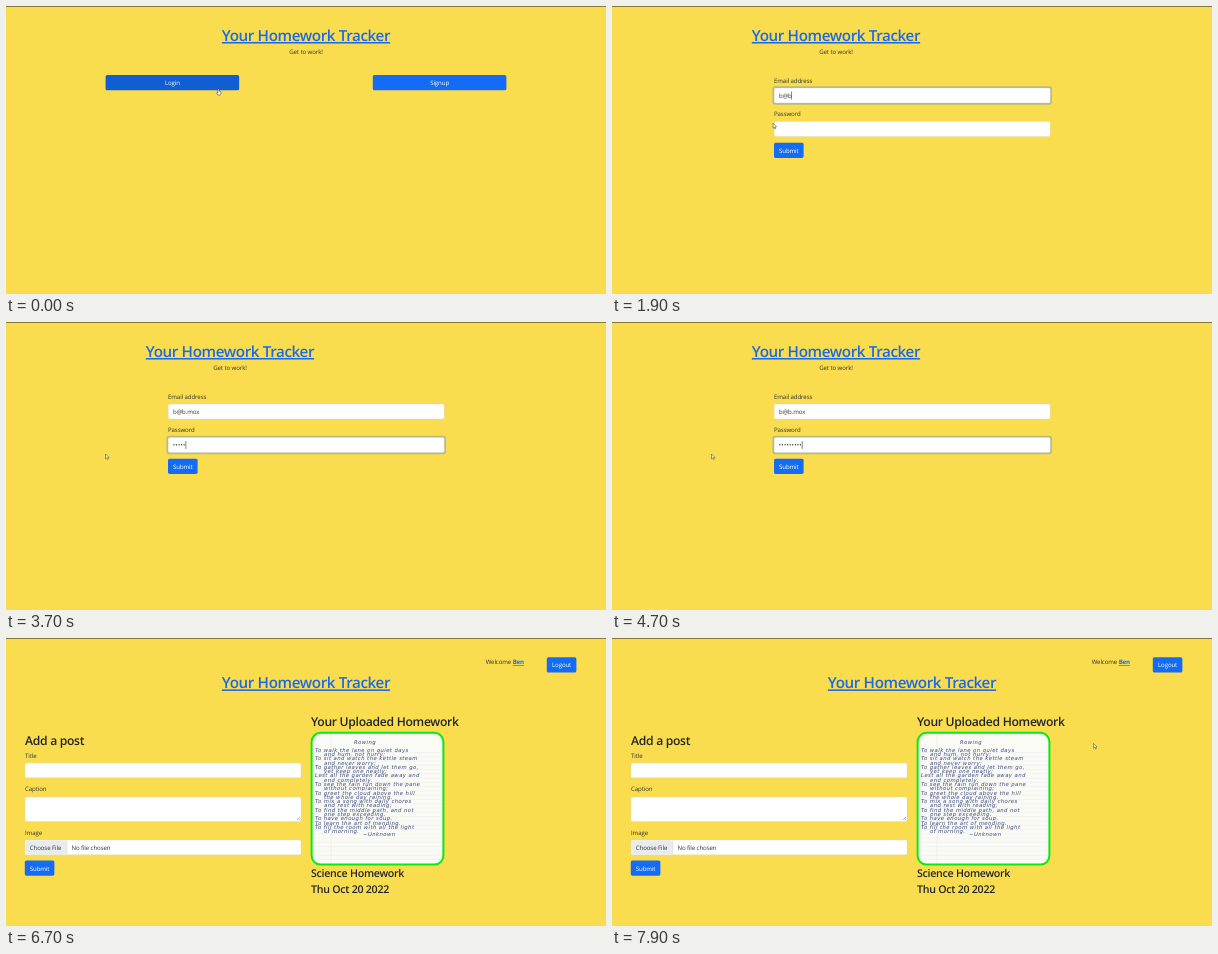
An HTML page that plays this animation: 600 px wide and 288 px high, repeating every 8 s.

```html
<!DOCTYPE html>
<html lang="en">
<head>
<meta charset="utf-8">
<title>Homework tracker</title>
<style>
  html, body { margin: 0; width: 100%; height: 100%; overflow: hidden; background: #f9dd4e; }
  svg { display: block; width: 100%; height: 100%; }
  text {
    font-family: "Open Sans", "Noto Sans", sans-serif;
    letter-spacing: -.015em; fill: #33342c;
    text-rendering: geometricPrecision; white-space: pre;
  }
  .head { font-weight: 600; letter-spacing: -.025em; fill: #212529; }
  .link { fill: #1a69ea; text-decoration: underline; }
  .mid { text-anchor: middle; }
  .white { fill: #fff; }
  .dots { letter-spacing: .045em; }
  .note { font-family: "DejaVu Sans", sans-serif; font-style: italic; letter-spacing: .08em; fill: #36457c; }
</style>
</head>
<body>
<svg id="stage" viewBox="0 0 600 288" preserveAspectRatio="none"></svg>
<script>
const LOOP = 8000, STEP = 100, BLUE = '#146cf6';
const stage = document.getElementById('stage');

// Nominal sizes are trimmed a little to suit the font's large x-height.
const text = (x, y, size, str, cls = '', id = '') =>
  `<text id="${id}" class="${cls}" x="${x}" y="${y}" font-size="${(size * .95).toFixed(2)}">${str}</text>`;
const body = (x, y, str, cls, id) => text(x, y, 6.4, str, cls, id);
const head = (x, y, size, str) => text(x, y, size, str, 'head');
const title = (x, y) => text(x, y, 16, 'Your Homework Tracker', 'head link mid');
const box = (x, y, w, h, fill, more = '') =>
  `<rect x="${x}" y="${y}" width="${w}" height="${h}" rx="1.6" fill="${fill}" ${more}/>`;
const button = (x, y, w, label, id = '') =>
  box(x, y, w, 15.2, BLUE, `id="${id}"`) + body(x + w / 2, y + 10, label, 'mid white');
const field = (x, y, h = 15.2) =>
  box(x + .2, y + .2, 276, h - .4, '#fff', 'stroke="#ced4da" stroke-width=".4"');
const glow = (x, y, w, id) =>
  `<g id="${id}">${box(x - .8, y - .8, w + 1.6, 16.8, 'none', 'stroke="#0d6efd" stroke-opacity=".28" stroke-width="1.6"')}` +
  box(x, y, w, 15.2, 'none', 'stroke="#86a8c8" stroke-width=".5"') + '</g>';

const poem = `To walk the lane on quiet days
and hum, not hurry;
To sit and watch the kettle steam
and never worry;
To gather leaves and let them go,
yet keep one neatly;
Lest all the garden fade away and
end completely.
To see the rain run down the pane
without complaining;
To greet the cloud above the hill
the whole day raining.
To mix a song with daily chores
and rest with reading;
To find the middle path, and not
one step exceeding.
To have enough for soup.
To learn the art of mending.
To fill the room with all the light
of morning.`.split('\n');

function paper() {
  const note = (x, y, str) => text(x, y.toFixed(2), 5.6, str, 'note');
  let out = '<rect x="306" y="95" width="131.5" height="131.5" rx="9" fill="#fbfbf6"/>' +
    '<path d="M325 96V225.5" stroke="#e6dcd8" stroke-width=".5"/>';
  for (let y = 114.5; y < 225; y += 4.28)
    out += `<path d="M307 ${y.toFixed(2)}H436.5" stroke="#dfe2e4" stroke-width=".35"/>`;
  out += note(348, 105.8, 'Rowing');
  poem.forEach((line, i) => {
    out += note(/^[A-Z]/.test(line) ? 309 : 318, 113.8 + i * 4.28, line);
  });
  return out + note(357, 198.3, '~Unknown') +
    '<rect x="305.6" y="94.8" width="131.8" height="131.8" rx="9" fill="none" stroke="#08ea16" stroke-width="2"/>';
}

const home = title(300, 35) + body(300, 48.2, 'Get to work!', 'mid') +
  glow(99.6, 69.1, 133.6, 'loginGlow') +
  button(99.6, 69.1, 133.6, 'Login', 'login') + button(366.8, 69.1, 133.6, 'Signup');

const form = title(224, 35) + body(224, 48.2, 'Get to work!', 'mid') +
  body(162, 76.6, 'Email address') + glow(162, 81.9, 276.4, 'mailGlow') + field(162, 81.9) +
  body(162, 110.2, 'Password') + glow(162, 115.4, 276.4, 'passGlow') + field(162, 115.4) +
  body(167, 91.8, '', '', 'mail') + body(166.8, 125.2, '', 'dots', 'pass') +
  '<rect id="caret" width=".6" height="8" fill="#333"/>' +
  button(162, 136.7, 29.6, 'Submit');

const board = body(479.7, 26.2, 'Welcome <tspan class="link" font-weight="700">Ben</tspan>') +
  button(540.8, 19.3, 29.6, 'Logout') + title(300, 50.4) +
  head(19, 106.8, 12.8, 'Add a post') +
  body(19, 119.7, 'Title') + field(18.8, 124.8) +
  body(19, 153.3, 'Caption') + field(18.8, 158.8, 24.8) +
  '<path d="M291 182l3 -3M292.8 182l1.2 -1.2" stroke="#777" stroke-width=".5"/>' +
  body(19, 196.5, 'Image') + field(18.8, 201.8) +
  box(19.2, 202.2, 41.6, 14.4, '#e9ecef') + '<path d="M60.8 202.2v14.4" stroke="#ced4da" stroke-width=".5"/>' +
  body(23.8, 211.9, 'Choose File') + body(65.4, 211.9, 'No file chosen') +
  button(18.8, 222.5, 29.6, 'Submit') +
  head(305, 88, 12.8, 'Your Uploaded Homework') + paper() +
  head(305, 238.6, 11.2, 'Science Homework') + head(305, 255, 11.2, 'Thu Oct 20 2022');

const cursors = {
  arrow: '<path d="M0 0V4.8L1.2 3.8L2 5.6L2.8 5.2L2.1 3.5H3.5Z" fill="#fff" stroke="#333" stroke-width=".5"/>',
  beam: '<path d="M-1 -2.6H1M0 -2.6V2.6M-1 2.6H1" fill="none" stroke="#222" stroke-width=".6"/>',
  hand: '<path d="M-.6 -3Q0 -3.6 .5 -3V-1L2.4 -.4V1.4L1.7 3H-.8L-2 .9L-1.4 .3L-.6 .9Z" fill="#fff" stroke="#222" stroke-width=".5"/>'
};

stage.innerHTML = '<rect width="600" height="288" fill="#f9dd4e"/><rect width="600" height="1" fill="#857839"/>' +
  `<g id="home">${home}</g><g id="form">${form}</g><g id="board">${board}</g><g id="cursor">` +
  Object.entries(cursors).map(([k, v]) => `<g id="${k}">${v}</g>`).join('') + '</g>';

const $ = id => document.getElementById(id);
const show = (id, on) => $(id).setAttribute('display', on ? 'inline' : 'none');

const MAIL = 'b@b.mox', TO_FORM = 500, TO_BOARD = 6300;
const MAIL_FOCUS = 1300, PASS_FOCUS = 2500;
const typed = (t, start, gap, max) => Math.max(0, Math.min(max, Math.floor((t - start) / gap) + 1));

// Pointer stops: time, x, y
const stops = [
  [0, 212.5, 86], [700, 212.5, 86], [1000, 213, 87], [1500, 213, 87], [2100, 143, 128],
  [2800, 127.5, 133], [3000, 99.5, 132], [5700, 99.5, 132], [5800, 102, 134],
  [6800, 102, 134], [7500, 478, 103], [7900, 481.5, 105.5], [LOOP, 481.5, 105.5]
];
function pointer(t) {
  const i = stops.findIndex(s => s[0] > t), a = stops[i - 1], b = stops[i];
  const u = (t - a[0]) / (b[0] - a[0]), k = u * u * (3 - 2 * u);
  return [a[1] + (b[1] - a[1]) * k, a[2] + (b[2] - a[2]) * k];
}
function pointerKind(t, x, y) {
  if (t < TO_FORM) return 'hand';
  if (t < TO_BOARD) {
    const over = x > 162 && (y < 97 || y > 115);
    return over || t >= 5800 ? 'beam' : 'arrow';
  }
  return x < 295 && y > 125 ? 'beam' : 'arrow';
}

function draw(t) {
  const onForm = t >= TO_FORM && t < TO_BOARD;
  show('home', t < TO_FORM);
  show('form', onForm);
  show('board', t >= TO_BOARD);
  show('loginGlow', t >= 400);
  $('login').setAttribute('fill', t < 400 ? '#0f5fd2' : '#0a58ca');

  if (onForm) {
    const inPass = t >= PASS_FOCUS;
    const m = typed(t, 1600, 110, MAIL.length), p = typed(t, 3100, 150, 9);
    $('mail').textContent = MAIL.slice(0, m);
    $('pass').textContent = '•'.repeat(p);
    show('mailGlow', t >= MAIL_FOCUS && !inPass);
    show('passGlow', inPass);

    // The caret restarts its blink with every key.
    const last = inPass ? (p ? 3100 + (p - 1) * 150 : PASS_FOCUS)
                        : (m ? 1600 + (m - 1) * 110 : MAIL_FOCUS);
    show('caret', t >= MAIL_FOCUS && (t - last) % 1060 < 530);
    const len = (inPass ? p : m) ? $(inPass ? 'pass' : 'mail').getComputedTextLength() : 0;
    $('caret').setAttribute('x', 166.8 + len);
    $('caret').setAttribute('y', inPass ? 119 : 85.5);
  }

  const [x, y] = pointer(t), kind = pointerKind(t, x, y);
  $('cursor').setAttribute('transform', `translate(${x.toFixed(2)} ${y.toFixed(2)})`);
  show('cursor', t < TO_BOARD || t >= 6800);
  for (const k in cursors) show(k, k === kind);
}

const start = performance.now();
function tick(now) {
  const t = Math.max(0, now - start) % LOOP;
  draw(Math.floor(t / STEP) * STEP);
  requestAnimationFrame(tick);
}
draw(0);
requestAnimationFrame(tick);
</script>
</body>
</html>
```
